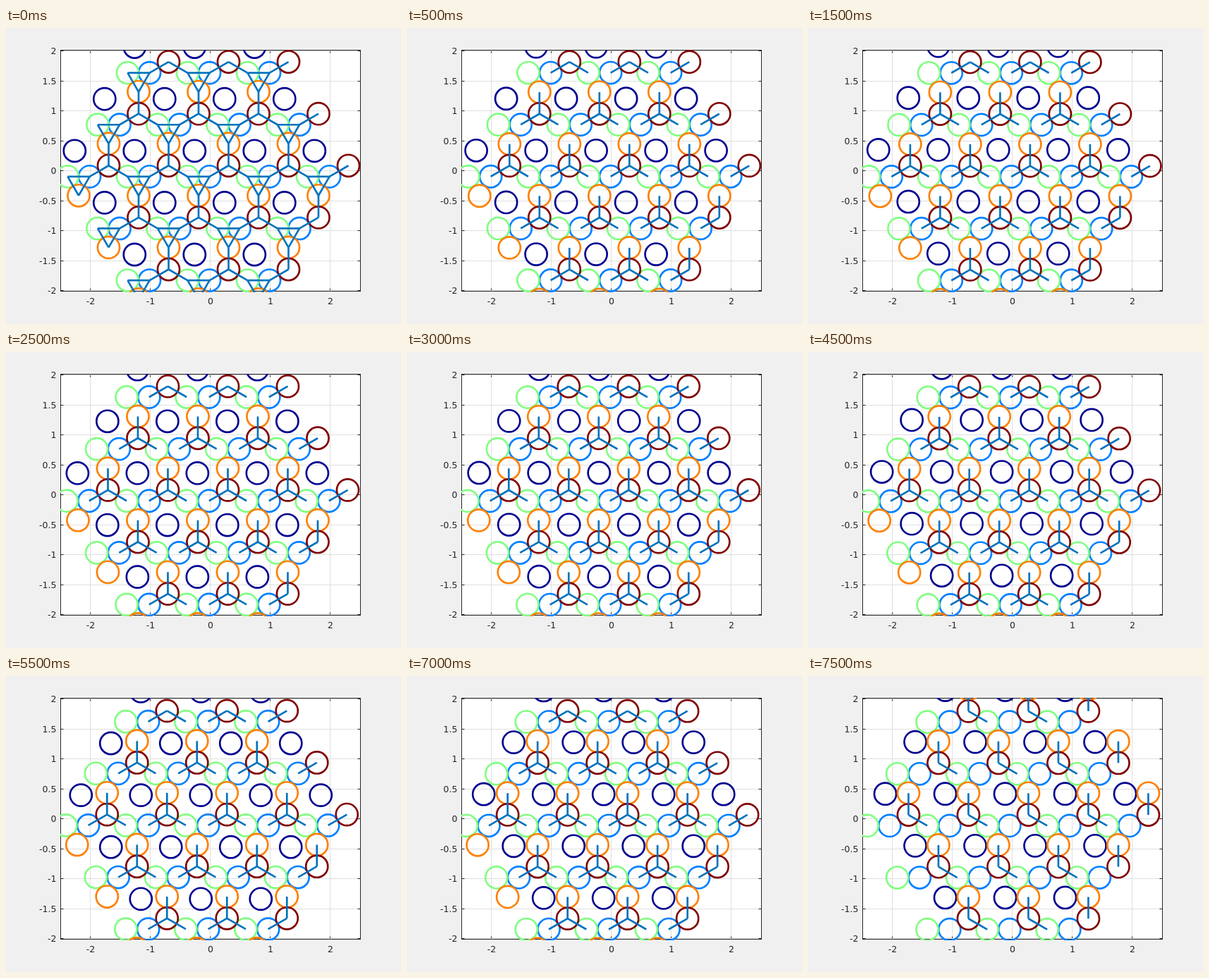
Write an HTML page with a canvas that moves like this. It is 560 by 420 pixels and loops after 8000 ms.

```html
<!DOCTYPE html>
<html lang="en">
<head>
<meta charset="utf-8">
<title>Disc packing</title>
<style>
  html, body { margin: 0; width: 100%; height: 100%; overflow: hidden; background: #f0f0f0; }
  canvas { display: block; width: 560px; height: 420px; }
</style>
</head>
<body>
<canvas id="stage" width="560" height="420"></canvas>
<script>
const ctx = document.getElementById('stage').getContext('2d');
const SCALE = 85, X0 = 290, Y0 = 202.5;
const BOX = { l: 77.5, t: 31.5, r: 502.5, b: 373.5 };
const STEP_MS = 500, STEPS = 16;
const ROOT3 = Math.sqrt(3);
const TOUCH = 1 / (1 + 1 / ROOT3) / ROOT3; // disc diameter at full contact
const COLORS = { navy: '#00008f', blue: '#0080ff', green: '#80ff80', orange: '#ff8000', red: '#800000' };

const px = x => X0 + x * SCALE;
const py = y => Y0 - y * SCALE;

// Hexagonal patch of 19 lattice cells
const cells = [];
for (let j = -2; j <= 2; j++)
  for (let i = -2; i <= 2; i++)
    if (Math.abs(i + j) <= 2) cells.push([i, j]);
const hasCell = (i, j) => Math.max(Math.abs(i), Math.abs(j), Math.abs(i + j)) <= 2;

function segment(x1, y1, x2, y2) {
  ctx.beginPath();
  ctx.moveTo(x1, y1);
  ctx.lineTo(x2, y2);
  ctx.stroke();
}

function drawAxes() {
  ctx.fillStyle = '#f0f0f0';
  ctx.fillRect(0, 0, 560, 420);
  ctx.fillStyle = '#fff';
  ctx.fillRect(BOX.l, BOX.t, BOX.r - BOX.l, BOX.b - BOX.t);
  ctx.font = '12.5px "DejaVu Sans", sans-serif';
  ctx.lineWidth = 1;

  const rule = (x1, y1, x2, y2, dx, dy) => {
    ctx.strokeStyle = '#dfdfdf';
    segment(x1, y1, x2, y2);
    ctx.strokeStyle = '#262626';
    segment(x1, y1, x1 + dx, y1 + dy);
    segment(x2, y2, x2 - dx, y2 - dy);
  };
  ctx.fillStyle = '#262626';
  ctx.textAlign = 'center';
  for (let v = -2; v <= 2; v++) {
    const x = Math.floor(px(v)) - 0.5;
    rule(x, BOX.b, x, BOX.t, 0, -4);
    ctx.fillText(v, px(v), 391.5);
  }
  ctx.textAlign = 'right';
  for (let v = -2; v <= 2; v += 0.5) {
    const y = Math.floor(py(v)) + 0.5;
    rule(BOX.l, y, BOX.r, y, 4, 0);
    ctx.fillText(v, 71.5, y + 4.5);
  }
  ctx.strokeRect(BOX.l, BOX.t, BOX.r - BOX.l, BOX.b - BOX.t);
}

// Disc positions inside the central cell
function sitesAt(step, wrapped) {
  const rx = 0.3 - 0.0024 * step, ry = 0.085 - 0.00139 * step;
  const tx = rx - 0.5, ty = ry - 0.5 / ROOT3;
  const side = step ? 0.3735 : TOUCH;
  const up = side / (2 * ROOT3);
  const shift = wrapped ? 1 : 0;
  return {
    navy: [-0.267 + 0.00959 * step, 0.332 + 0.00554 * step],
    blue: [tx + side / 2, ty + up],
    green: [tx - side / 2, ty + up],
    orange: [tx + shift / 2, ty - 2 * up + shift * ROOT3 / 2],
    red: [rx, ry]
  };
}

// Each bond: from, to, cell offset of the second disc
function bondsAt(step, wrapped) {
  const bonds = [['red', 'green', 1, 0], ['red', 'orange', 0, wrapped ? 0 : 1]];
  if (!wrapped) bonds.push(['red', 'blue', 0, 0]);
  if (step === 0) bonds.push(['green', 'blue', 0, 0], ['blue', 'orange', 0, 0], ['orange', 'green', 0, 0]);
  return bonds;
}

function draw(step) {
  const wrapped = step === STEPS - 1;
  const sites = sitesAt(step, wrapped);
  const place = (name, i, j) => [
    px(sites[name][0] + i + j / 2),
    py(sites[name][1] + j * ROOT3 / 2)
  ];

  drawAxes();
  ctx.save();
  ctx.beginPath();
  ctx.rect(77, 31, 426, 344);
  ctx.clip();
  ctx.lineWidth = 2.67;

  for (const name in COLORS) {
    ctx.strokeStyle = COLORS[name];
    for (const [i, j] of cells) {
      ctx.beginPath();
      ctx.arc(...place(name, i, j), TOUCH / 2 * SCALE, 0, 2 * Math.PI);
      ctx.stroke();
    }
  }

  ctx.strokeStyle = '#0072bd';
  for (const [from, to, di, dj] of bondsAt(step, wrapped))
    for (const [i, j] of cells)
      if (hasCell(i + di, j + dj))
        segment(...place(from, i, j), ...place(to, i + di, j + dj));
  ctx.restore();
}

const start = performance.now();
let shown = -1;
function tick() {
  const step = Math.floor((performance.now() - start) / STEP_MS) % STEPS;
  if (step !== shown) draw(shown = step);
  requestAnimationFrame(tick);
}
tick();
</script>
</body>
</html>
```
